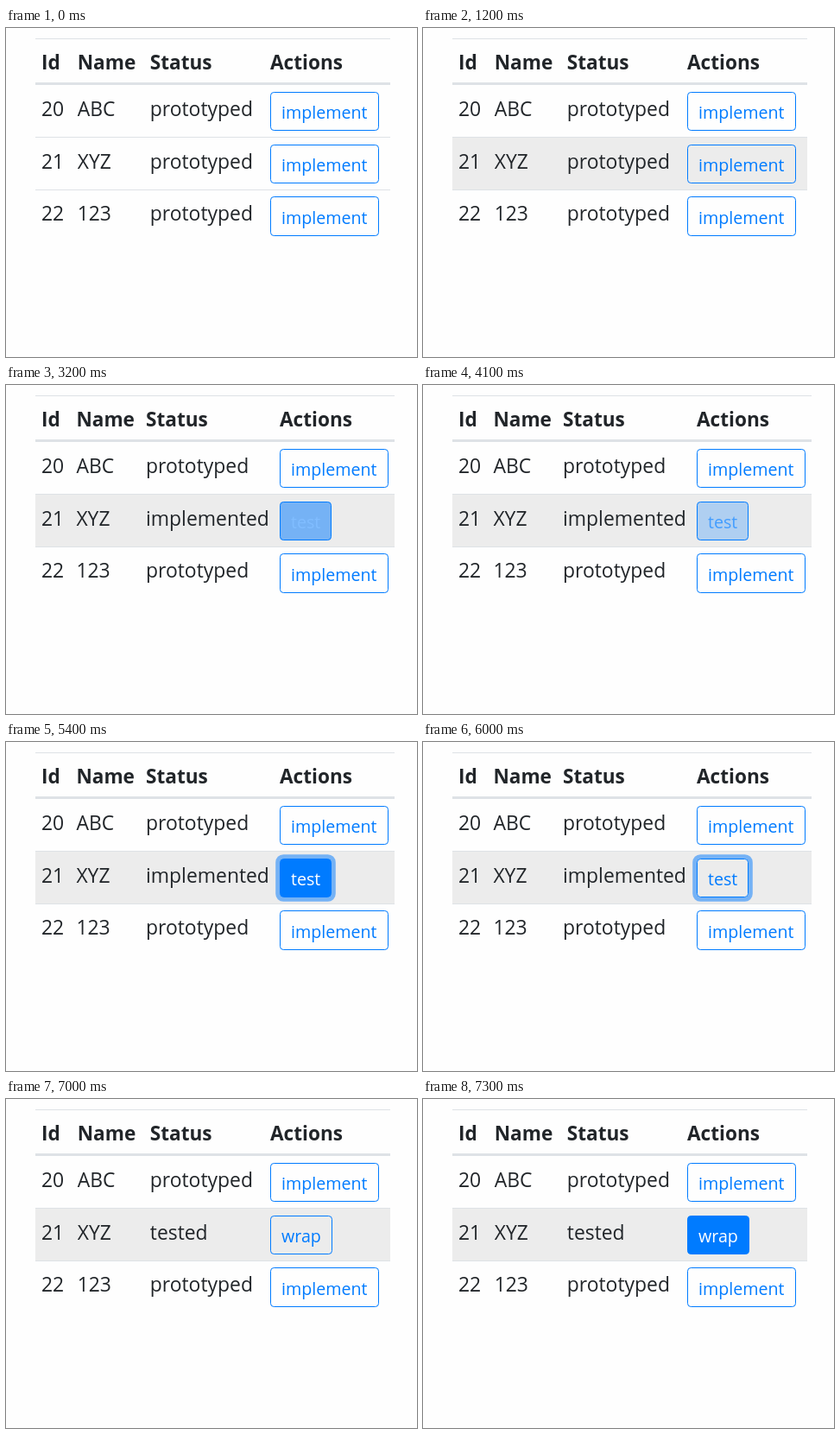
An HTML page that plays this animation: 476x381 px, repeating every 8 s.

```html
<!DOCTYPE html>
<html lang="en">
<head>
<meta charset="utf-8">
<title>Status table</title>
<style>
  html, body { margin: 0; width: 100%; height: 100%; overflow: hidden; background: #fefefe; }
  svg { display: block; width: 476px; height: 381px; }
  text { font-family: "Open Sans", "Noto Sans", sans-serif; font-size: 22.9px; fill: #212529; }
  .head { font-weight: 700; font-size: 22.6px; }
  .label { font-size: 19.65px; fill: #007bff; }
  .line { fill: #dee2e6; }
  .box { stroke: #007bff; fill: #007bff; }
  .ring { fill: none; stroke: #007bff; }
</style>
</head>
<body>
<svg id="stage" viewBox="0 0 476 381"></svg>
<script>
const LOOP = 8000;
const stage = document.getElementById('stage');

// Column starts and table width for the normal and the widened layout
const NORMAL = { cols: [41, 82.7, 166.8, 306], width: 411 };
const WIDE = { cols: [41, 81.4, 162, 317], width: 416 };
const PHASES = [
  { layout: NORMAL, status: 'prototyped', action: 'implement' },
  { layout: WIDE, status: 'implemented', action: 'test' },
  { layout: NORMAL, status: 'tested', action: 'wrap' }
];
const BUTTON_WIDTH = { implement: 126, test: 60, wrap: 72 };
const ROWS = [
  { id: '20', name: 'ABC', base: 102, top: 74, height: 45 },
  { id: '21', name: 'XYZ', base: 163, top: 135, height: 45 },
  { id: '22', name: '123', base: 223, top: 195, height: 46 }
];

// Each step: start time and the values that change from then on
const STEPS = [
  [0, { phase: 0, row: 0, fill: 0, ring: 0 }],
  [1200, { row: 1 }],
  [1300, { fill: 0.5 }],
  [1400, { fill: 1 }],
  [2200, { ring: 0.5 }],
  [2300, { ring: 1 }],
  [3200, { phase: 1, fill: 0.5, ring: 0 }],
  [3300, { fill: 1 }],
  [4100, { fill: 0.26 }],
  [4200, { fill: 0 }],
  [4700, { fill: 0.5 }],
  [4800, { fill: 1 }],
  [5300, { ring: 0.5 }],
  [5400, { ring: 1 }],
  [5900, { fill: 0.26 }],
  [6000, { fill: 0 }],
  [6100, { row: 0 }],
  [6300, { phase: 2, ring: 0 }],
  [7000, { row: 1 }],
  [7200, { fill: 0.5 }],
  [7300, { fill: 1 }]
];

function set(node, attrs) {
  for (const key in attrs) node.setAttribute(key, attrs[key]);
}

function add(tag, attrs) {
  const node = document.createElementNS('http://www.w3.org/2000/svg', tag);
  set(node, attrs);
  return stage.appendChild(node);
}

function addText(content, y, className = '') {
  const node = add('text', { y, class: className });
  node.textContent = content;
  return node;
}

const hover = add('rect', { x: 34, y: 127, height: 60, fill: '#ececec' });
const lines = [[12, 1], [63, 3], [126, 1], [187, 1]].map(([y, height]) =>
  add('rect', { x: 34, y, height, class: 'line' }));
const heads = ['Id', 'Name', 'Status', 'Actions'].map(title => addText(title, 48, 'head'));
const rows = ROWS.map(({ id, name, base, top, height }) => ({
  cells: [id, name, 'prototyped'].map(content => addText(content, base)),
  ring: add('rect', { class: 'ring' }),
  box: add('rect', { y: top + 0.5, height: height - 1, rx: 3.8, class: 'box' }),
  label: addText('implement', top + (height > 45 ? 32 : 31), 'label'),
  top, height
}));

function drawButton(row, x, action, fill, ring) {
  const width = BUTTON_WIDTH[action];
  const spread = 4.8 * ring;
  const white = Math.round(255 * fill);
  const green = Math.round(123 + 132 * fill);
  set(row.box, { x: x + 0.5, width: width - 1, 'fill-opacity': fill });
  set(row.ring, {
    x: x - spread / 2, y: row.top - spread / 2,
    width: width + spread, height: row.height + spread,
    rx: 4.3 + spread / 2, 'stroke-width': spread, 'stroke-opacity': 0.5 * ring
  });
  row.label.setAttribute('x', x + 13);
  row.label.style.fill = `rgb(${white},${green},255)`;
  row.label.textContent = action;
}

function draw(time) {
  const state = {};
  for (const [start, change] of STEPS) {
    if (start <= time) Object.assign(state, change);
  }
  const { layout, status, action } = PHASES[state.phase];
  const { cols, width } = layout;

  set(hover, { width, opacity: state.row });
  lines.forEach(line => line.setAttribute('width', width));
  heads.forEach((head, i) => head.setAttribute('x', cols[i]));
  rows.forEach((row, i) => {
    row.cells.forEach((cell, j) => cell.setAttribute('x', cols[j]));
    if (i === 1) {
      row.cells[2].textContent = status;
      drawButton(row, cols[3], action, state.fill, state.ring);
    } else {
      drawButton(row, cols[3], 'implement', 0, 0);
    }
  });
}

const begin = performance.now();
function tick() {
  draw((performance.now() - begin) % LOOP);
  requestAnimationFrame(tick);
}
tick();
</script>
</body>
</html>
```
